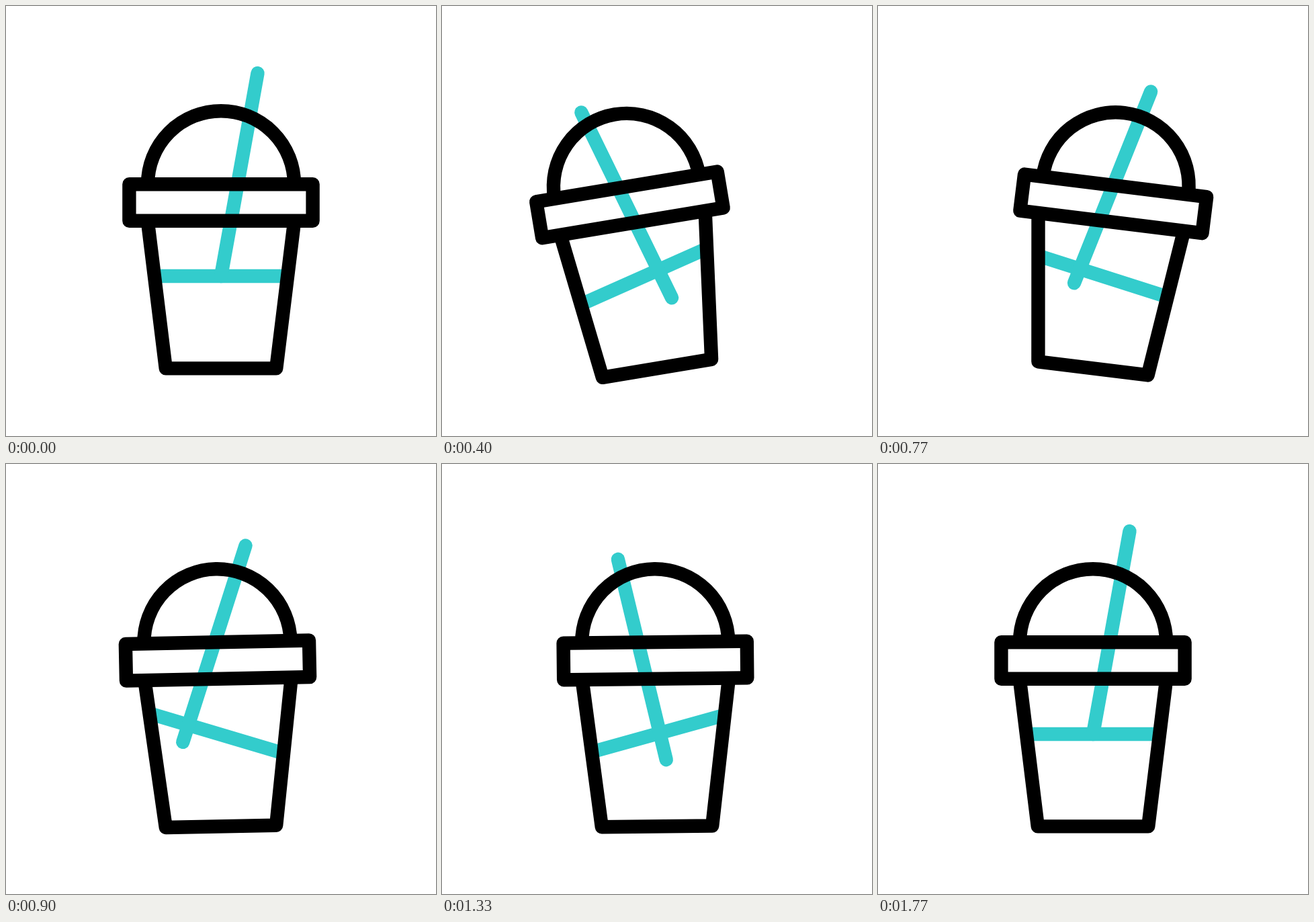
An HTML page with a canvas that plays this animation: 640 px wide and 640 px high, repeating every 2000 ms.

```html
<!DOCTYPE html>
<html lang="en">
<head>
<meta charset="utf-8">
<title>Shaking cup</title>
<style>
  html, body { margin: 0; width: 100%; height: 100%; overflow: hidden; background: #fff; }
  canvas { display: block; width: 640px; height: 640px; }
</style>
</head>
<body>
<canvas id="stage" width="640" height="640"></canvas>
<script>
const ctx = document.getElementById('stage').getContext('2d');
const FPS = 30, STEPS = 60;
const BLACK = '#000', TEAL = '#33cccc';
const CX = 320, BASE_Y = 539.4, SURFACE_Y = 402;
const STRAW = { length: 306.9, tilt: 10.23 };

const rad = deg => deg * Math.PI / 180;
const smooth = u => u * u * (3 - 2 * u);

// Eases from rest through evenly spaced peaks and back to rest at `end`.
function swing(t, first, gap, end, peaks) {
  if (t >= end) return 0;
  const next = t < first ? 0 : Math.min(peaks.length, Math.floor((t - first) / gap) + 1);
  const from = next ? first + gap * (next - 1) : 0;
  const to = next < peaks.length ? first + gap * next : end;
  const a = next ? peaks[next - 1] : 0;
  const b = next < peaks.length ? peaks[next] : 0;
  return a + (b - a) * smooth((t - from) / (to - from));
}

function turn(y, deg) {
  ctx.translate(CX, y);
  ctx.rotate(rad(deg));
  ctx.translate(-CX, -y);
}

function cupPath() {
  ctx.beginPath();
  ctx.moveTo(CX - 109.2, 320);
  ctx.lineTo(CX - 82.2, BASE_Y);
  ctx.lineTo(CX + 82.2, BASE_Y);
  ctx.lineTo(CX + 109.2, 320);
}

function line(x0, y0, x1, y1) {
  ctx.beginPath();
  ctx.moveTo(x0, y0);
  ctx.lineTo(x1, y1);
  ctx.stroke();
}

function drawLiquid(deg) {
  ctx.save();
  cupPath();
  ctx.clip();
  turn(SURFACE_Y, deg);
  line(CX - 140, SURFACE_Y, CX + 140, SURFACE_Y);
  ctx.restore();
}

function drawStraw(deg, dx, dy) {
  const x = CX + dx, y = SURFACE_Y + dy, a = rad(deg);
  ctx.lineCap = 'round';
  line(x, y, x + STRAW.length * Math.sin(a), y - STRAW.length * Math.cos(a));
  ctx.lineCap = 'butt';
}

function drawCup() {
  cupPath();
  ctx.stroke();
  ctx.beginPath();
  ctx.arc(CX, 265.2, 109, Math.PI, 2 * Math.PI);
  ctx.stroke();
  ctx.strokeRect(CX - 136.6, 265.2, 273.2, 54.6);
}

function draw(t) {
  ctx.fillStyle = '#fff';
  ctx.fillRect(0, 0, 640, 640);
  ctx.lineWidth = 20.4;
  ctx.lineJoin = 'round';
  ctx.save();
  turn(BASE_Y, swing(t, .295, .37, 1.405, [-14.2, 10, -6]));
  ctx.strokeStyle = TEAL;
  drawLiquid(swing(t, .455, .445, 1.775, [-15.1, 17.7, -15]));
  drawStraw(
    STRAW.tilt + swing(t, .4, .47, 1.77, [-26.8, 9, -23.2]),
    swing(t, .4, .47, 1.77, [39, -55, 14.8]),
    swing(t, .435, .44, 1.77, [38, 10.5, 38.5])
  );
  ctx.strokeStyle = BLACK;
  drawCup();
  ctx.restore();
}

const start = performance.now();

function tick() {
  const ms = performance.now() - start;
  draw(Math.floor((ms + 3.4) * FPS / 1000) % STEPS / FPS);
  requestAnimationFrame(tick);
}
tick();
</script>
</body>
</html>
```
